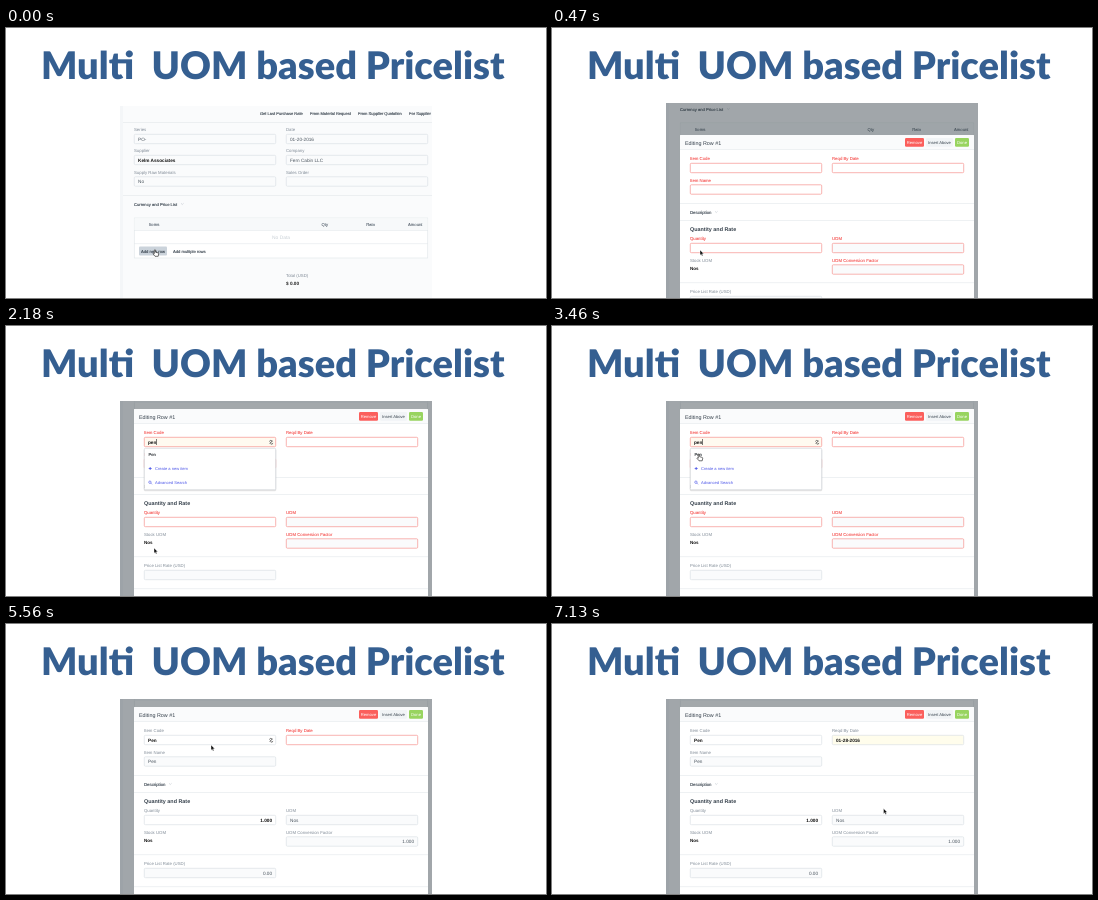
Recreate the animation shown at these times as an HTML page. Size 540 px wide and 270 px high, loop 8 s.

```html
<!DOCTYPE html>
<html lang="en">
<head>
<meta charset="utf-8">
<title>Multi UOM based Pricelist</title>
<style>
html, body { margin: 0; width: 100%; height: 100%; overflow: hidden; background: #fff; }
svg { display: block; width: 540px; height: 270px; }
text { font-family: "Liberation Sans", Arial, sans-serif; white-space: pre; text-rendering: geometricPrecision; }
.title { font-family: Lato, sans-serif; font-weight: 900; }
</style>
</head>
<body>
<svg viewBox="0 0 540 270">
  <defs><clipPath id="stage"><rect x="114" y="75" width="312" height="195"/></clipPath></defs>
  <text class="title" x="35" y="51" font-size="38" fill="#355f91">Multi  UOM based Pricelist</text>
  <g id="scene" clip-path="url(#stage)"></g>
</svg>
<script>
const INK = '#36414c', GREY = '#7f8a96', RED = '#f5504e', LINE = '#e3e8ec', PAPER = '#fafbfc';
const LEFT = 138, RIGHT = 280, LOOP = 8000;

const rect = (x, y, w, h, fill, more = '') =>
  `<rect x="${x}" y="${y}" width="${w}" height="${h}" fill="${fill}" ${more}/>`;
const text = (x, y, s, size = 4.3, fill = INK, more = '') =>
  `<text x="${x}" y="${y}" font-size="${size}" fill="${fill}" ${more}>${s}</text>`;
const path = (d, more) => `<path d="${d}" ${more}/>`;
const move = (x, y, s) => `<g transform="translate(${x} ${y})">${s}</g>`;
const rule = (x, y, w) => rect(x, y, w, 0.6, LINE);
const BOLD = 'font-weight="700"', END = 'text-anchor="end"', MID = 'text-anchor="middle"';
const MEDIUM = `stroke="${INK}" stroke-width=".12"`;
const chevron = (x, y) => path(`M${x} ${y}l1.3 1.2 1.3-1.2`, 'fill="none" stroke="#b5bdc5" stroke-width=".5"');

// A label with its box; y is the top of the box.
function field(x, y, w, label, o = {}) {
  const value = o.value || '';
  const tx = o.end ? x + w - 4 : x + 4;
  return text(x, y - 2.7, label, 4.3, o.red ? RED : GREY, o.red ? `stroke="${RED}" stroke-width=".1"` : '') +
    rect(x + 0.3, y + 0.3, w - 0.6, 9.4, o.fill || PAPER,
      `rx="1" stroke="${o.red ? '#f79490' : '#dbe1e6'}" stroke-width=".7"`) +
    text(tx, y + 6.6, value, 4.7, o.bold ? '#111' : '#4a545e', (o.bold ? BOLD : '') + (o.end ? END : '')) +
    (o.caret ? rect(x + 3.6 + o.caret, y + 2, 0.6, 6, '#222') : '');
}

function page(s) {
  let out = rect(117, 78, 309, 400, PAPER) + rect(114, 78, 3, 400, '#f4f6f8');
  [[254, 'Get Last Purchase Rate'], [304, 'From Material Request'],
   [352, 'From Supplier Quotation'], [403, 'For Supplier']]
    .forEach(([x, label]) => out += text(x, 87, label, 4.03, INK, MEDIUM));
  out += rule(117, 94, 309);
  out += field(128, 106, 142, 'Series', { value: 'PO-' });
  out += field(RIGHT, 106, 142, 'Date', { value: '01-20-2016' });
  out += field(128, 127, 142, 'Supplier', { value: 'Kelm Associates', bold: 1, fill: s.open ? '#fff3e4' : PAPER });
  out += field(RIGHT, 127, 142, 'Company', { value: 'Fern Cabin LLC' });
  out += field(128, 148.5, 142, 'Supply Raw Materials', { value: 'No' });
  out += field(RIGHT, 148.5, 142, 'Sales Order');
  out += rule(117, 167, 309);
  out += text(128, 177.5, 'Currency and Price List', 4.15, INK, MEDIUM) + chevron(175, 175.3);
  out += rect(128.3, 190, 293.4, 40, '#fff', `stroke="${LINE}" stroke-width=".7"`) + rect(128.6, 190.3, 292.8, 11.7, '#f7f9fa');
  out += text(143, 197.5, 'Items', 4.2, GREY, MEDIUM);
  [[322, 'Qty'], [369, 'Rate'], [416.5, 'Amount']]
    .forEach(([x, label]) => out += text(x, 197.5, label, 4.2, GREY, END + ' ' + MEDIUM));
  if (s.open) return out;
  out += rule(128, 202, 294) + rule(128, 215.5, 294);
  out += text(275, 211, 'No Data', 4.9, '#c9d0d6', MID);
  out += rect(133, 218.5, 28, 9, '#cbd3db', 'rx="1"') + text(135, 224.5, 'Add new row', 4.15, INK, MEDIUM);
  out += text(167, 224.5, 'Add multiple rows', 4.15, INK, MEDIUM);
  out += text(RIGHT, 248.5, 'Total (USD)', 4.3, GREY) + text(RIGHT, 257, '$ 0.00', 4.7, '#222', BOLD);
  return out;
}

function modal(s) {
  let out = rect(128, 83, 294, 300, '#fff', 'rx="1"') + rect(128, 83, 294, 14, PAPER, 'rx="1"') + rule(128, 97, 294);
  out += text(133, 92.7, 'Editing Row #1', 5.4);
  out += rect(353, 86, 19, 8.8, '#fb5f5c', 'rx="1.2"') + text(362.5, 92, 'Remove', 4.15, '#fff', MID);
  out += rect(374, 86, 27, 8.8, '#f1f4f6', 'rx="1.2"') + text(387.5, 92, 'Insert Above', 4.1, INK, MID);
  out += rect(403, 86, 14, 8.8, '#98d45f', 'rx="1.2"') + text(410, 92, 'Done', 4.15, '#fff', MID);

  out += field(LEFT, 111, 132, 'Item Code', { value: s.code, bold: 1, red: !s.picked, fill: s.codeFill || '#fff', caret: s.codeCaret });
  if (s.link) out += path('M263.6 117.4l2.9-2.4M263.3 115.4l1.4-1 1.6.8M264.4 117.6l1.5.6 1.2-1', 'fill="none" stroke="#444" stroke-width=".8"');
  out += field(RIGHT, 111, 132, 'Reqd By Date', { value: s.date, bold: 1, red: !s.dated, fill: s.dateFill || '#fff', caret: s.dateCaret });
  out += field(LEFT, 132.5, 132, 'Item Name', { value: s.name, red: !s.name, fill: s.name ? PAPER : '#fff' });
  out += rule(128, 151, 294) + text(LEFT, 161.5, 'Description', 4.3, INK, MEDIUM) + chevron(163, 159.3) + rule(128, 168, 294);
  out += text(LEFT, 179, 'Quantity and Rate', 5.4, INK, BOLD);
  out += field(LEFT, 191, 132, 'Quantity', { value: s.filled && '1.000', red: !s.filled, bold: 1, end: 1, fill: '#fff' });
  out += field(RIGHT, 191, 132, 'UOM', { value: s.filled && 'Nos', red: !s.filled });
  out += text(LEFT, 209.7, 'Stock UOM', 4.3, GREY) + text(LEFT, 217.7, 'Nos', 4.5, '#111', BOLD);
  out += field(RIGHT, 212.5, 132, 'UOM Conversion Factor', { value: s.filled && '1.000', red: !s.filled, end: 1 });
  out += rule(128, 230.5, 294);
  out += field(LEFT, 244, 132, 'Price List Rate (USD)', { value: s.priced && '0.00', end: 1 });
  return out + rule(128, 262.5, 294);
}

const shadowed = (x, y, w, h) =>
  rect(x - 0.6, y + 0.8, w + 1.2, h + 0.6, '#000', 'opacity=".1" rx="1.5"') +
  rect(x, y, w, h, '#fff', 'rx="1" stroke="#c9cfd4" stroke-width=".6"');

function list(items) {
  const extra = (items.length - 1) * 12;
  let out = shadowed(138.3, 122.3, 131.4, 41.5 + extra);
  items.forEach((item, i) => out += text(142.5, 130 + i * 12, item, 4.2, '#222', MEDIUM));
  const link = (y, icon, label) => text(149, y, label, 4.07, '#4b55e8') + move(144.2, y - 1.5, icon);
  out += link(144 + extra, path('M-1.5 0h3M0-1.5v3', 'stroke="#4b55e8" stroke-width=".8"'), 'Create a new item');
  out += link(158 + extra, path('M.6.6l1.2 1.2M.9-.3a1.2 1.2 0 1 0-2.4 0a1.2 1.2 0 1 0 2.4 0', 'fill="none" stroke="#4b55e8" stroke-width=".6"'), 'Advanced Search');
  return out;
}

function calendar(hover) {
  const col = i => 285.5 + i * 11.25;
  let out = shadowed(280, 122.3, 79.5, 77.5);
  [[285.2, -1], [353.8, 1]].forEach(([x, d]) => out += `<circle cx="${x}" cy="127" r="2.2" fill="#222"/>` +
    path(`M${x - d * 0.5} 125.9l${d * 1.2} 1.1 ${-d * 1.2} 1.1`, 'fill="none" stroke="#fff" stroke-width=".5"'));
  [[291, 28, 'Jan'], [321.5, 26.5, '2016']].forEach(([x, w, label]) => {
    const bx = x + w - 5;
    out += rect(x, 123.8, w, 6.2, '#fff', 'rx="1" stroke="#ccc" stroke-width=".4"') + text(x + 2.5, 128.4, label, 3.9, '#222');
    out += rect(bx, 123.8, 5, 6.2, '#3f8cf0', 'rx="1"') +
      path(`M${bx + 1.5} 126.3l1-1 1 1M${bx + 1.5} 127.5l1 1 1-1`, 'fill="none" stroke="#fff" stroke-width=".5"');
  });
  'Su Mo Tu We Th Fr Sa'.split(' ').forEach((d, i) => out += text(col(i), 139.2, d, 4.1, '#333', BOLD + ' ' + MID));
  for (let day = 1; day <= 31; day++) {
    const cell = day + 4, x = col(cell % 7), y = 149.7 + Math.floor(cell / 7) * 9;
    if (day === 20 || day === hover) out += rect(x - 5.3, y - 5.8, 10.6, 8.4, day === 20 ? '#e2e7ea' : '#eef1f3');
    out += text(x, y, day, 4.3, '#4a545e', MID);
  }
  return out;
}

const POINTERS = {
  arrow: path('M0 0v5.2l1.2-1 .8 1.8 1-.4-.8-1.8h1.6z', 'fill="#111" stroke="#fff" stroke-width=".4"'),
  hand: path('M-.7 0q.7-.8 1.3 0v2.2l2.6.7q.6.3.5 1l-.5 2.4h-3.2l-2-2.5q.2-1 1.3-.1z', 'fill="#fff" stroke="#111" stroke-width=".6"'),
  beam: path('M-1-2.5h2M0-2.5v5M-1 2.5h2', 'fill="none" stroke="#222" stroke-width=".7"')
};

// Each step keeps what came before and changes only what it names.
const STEPS = [
  [0, { dy: 0, pointer: 'hand', at: [149, 222] }],
  [140, { open: 1, my: 119, shade: 0.3 }],
  [320, { dy: -29, my: 90, shade: 0.4, pointer: 'beam', at: [148, 222.5] }],
  [470, { dy: -95, my: 24, shade: 0.45, pointer: 'arrow', at: [148, 222] }],
  [650, { dy: -125, my: 0, link: 1, codeCaret: 0.3 }],
  [830, { codeFill: '#fffaf0' }],
  [1430, { code: 'pe', codeCaret: 5.8, items: ['Pen', 'Paper', 'Pencil'] }],
  [1580, { code: 'pen', codeCaret: 8.8 }],
  [2180, { items: ['Pen'] }],
  [2480, { at: [151, 214] }],
  [2640, { at: [156, 196], codeCaret: 0 }],
  [2800, { at: [158, 176] }],
  [2960, { at: [156, 157], pointer: 'hand' }],
  [3130, { at: [152, 144], codeCaret: 8.8 }],
  [3300, { at: [149, 133] }],
  [3460, { at: [147, 128.5] }],
  [3610, { code: 'Pen', codeCaret: 9.2, items: 0, picked: 1, codeFill: '#fff', pointer: 'arrow', at: [147, 128] }],
  [3760, { name: 'Pen' }],
  [3910, { filled: 1 }],
  [4060, { priced: 1, codeCaret: 0 }],
  [4210, { codeCaret: 9.2 }],
  [4810, { codeCaret: 0 }],
  [5260, { at: [158, 126] }],
  [5420, { at: [205, 121] }],
  [5590, { at: [262, 117] }],
  [5750, { at: [294, 116], pointer: 'beam' }],
  [5920, { link: 0, dateCaret: 0.3, dateFill: '#fffaf0', cal: 1 }],
  [6080, { at: [305, 141], pointer: 'arrow' }],
  [6250, { at: [318, 164], pointer: 'hand', hover: 13 }],
  [6390, { at: [324, 174], hover: 20 }],
  [6540, { at: [326, 178], hover: 21 }],
  [6690, { at: [329, 182], hover: 28 }],
  [6840, { cal: 0, date: '01-28-2016', dateCaret: 0, dated: 1, dateFill: '#fffdec', pointer: 'arrow' }],
  [6990, { at: [331, 183.5] }],
  [7130, { at: [331.5, 184.5] }]
];

function draw(step) {
  const s = Object.assign({}, ...STEPS.slice(0, step + 1).map(([, change]) => change));
  let out = move(0, s.dy, page(s));
  if (s.open) out += rect(114, 75, 312, 195, '#333f46', `opacity="${s.shade}"`) + move(0, s.my, modal(s));
  if (s.items) out += list(s.items);
  if (s.cal) out += calendar(s.hover);
  return out + move(...s.at, POINTERS[s.pointer]);
}

const scene = document.getElementById('scene');
let shown = -1;
function tick() {
  const t = performance.now() % LOOP;
  const step = STEPS.filter(([at]) => at <= t).length - 1;
  if (step !== shown) scene.innerHTML = draw(shown = step);
  requestAnimationFrame(tick);
}
tick();
</script>
</body>
</html>
```
